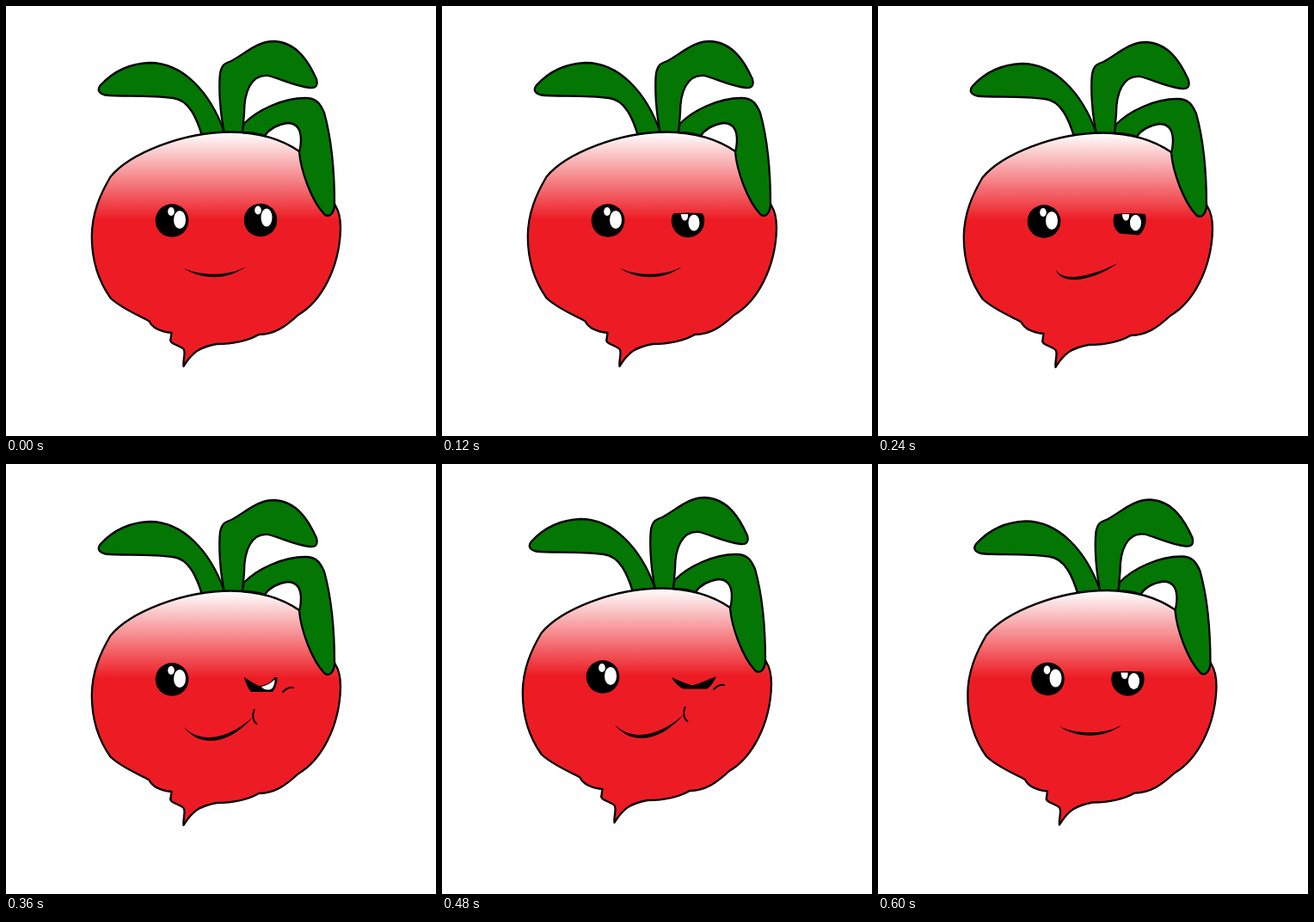
An HTML page that plays this animation: 500x500 px, repeating every 720 ms.

```html
<!DOCTYPE html>
<html lang="en">
<head>
<meta charset="utf-8">
<title>Winking radish</title>
<style>
html, body { margin: 0; width: 100%; height: 100%; overflow: hidden; background: #fff; }
svg { display: block; width: 100%; height: 100%; }
.leaf { fill: #047604; }
.leaf, .body { stroke: #000; stroke-width: 2.3; stroke-linejoin: round; }
.shine { fill: #fff; }
.line { fill: none; stroke: #000; stroke-width: 2; stroke-linecap: round; }
</style>
</head>
<body>
<svg viewBox="0 0 500 500">
  <defs>
    <linearGradient id="skin" gradientUnits="userSpaceOnUse" x1="0" y1="147" x2="0" y2="248">
      <stop offset="0" stop-color="#fff"/>
      <stop offset="1" stop-color="#ed1c24"/>
    </linearGradient>
  </defs>
  <g id="radish">
    <path class="leaf" d="M228 151C222 131 213 109 194 107C165 103.500 135 105.500 115 103.500C107 101 106 97 110 92C122 79 140 67 167 66C205 66 237 99 254 147Z"/>
    <path class="leaf" d="M254 148C249 125 247 95 249 78C251 69 253 67 262 64C280 54 292 41 312 41C338 42 352 65 361 85C363 93 360 96 353 95C335 93 318 84 305 81C285 79 277 100 277 124L275 148Z"/>
    <path class="body" fill="url(#skin)" d="M121.500 198.500C144 171.500 205 146.500 262 146.500C300 147 325 158 341 169L383 232C388 240 389 249 389 258C388 305 366 344 340 359C325 373 312 382 294 382C280 390 262 393 245 393C225 397 217 402 206.500 419C205.500 411 209.500 403 206.500 399C201.500 394 189 393 191.500 387L192.500 380C183 379 171 376 166.500 366.500C152 358.500 134 351.500 121.500 339.500C107 319 99.800 296 99.800 268C99.800 241 109.500 219 121.500 198.500Z"/>
    <path class="leaf" d="M275 147L276.500 137C292 121 322 107 348 107C362 107 366 115 370 124C380 160 382 200 382 232C381 241 376 247 370 242C355 226 343 192 341 170C344 158 346 136 327 136C315 138 306 143 301 151Q288 147 275 147Z"/>
    <circle cx="193" cy="249.500" r="19.300"/>
    <ellipse class="shine" cx="202" cy="248.500" rx="7" ry="10.500"/>
    <ellipse class="shine" cx="192" cy="239" rx="3.800" ry="5"/>

    <g data-show="open">
      <circle cx="296" cy="249" r="19.300"/>
      <ellipse class="shine" cx="303" cy="246" rx="6.500" ry="10.500"/>
      <ellipse class="shine" cx="293" cy="237.500" rx="3.800" ry="5"/>
    </g>
    <g data-show="lowered">
      <path d="M270 241Q286 240 302 241Q305 242 305.200 250A19.200 19.200 0 0 1 266.800 250Q267 242 270 241Z"/>
      <ellipse class="shine" cx="293" cy="252" rx="6.500" ry="9.500"/>
      <path class="shine" d="M278 242H286C287 252 278 252 278 242Z"/>
    </g>
    <g data-show="narrow">
      <path d="M275 241Q293 239 311 241C313 252 309 262 303 265.500L281 263.500C274 259 272 249 275 241Z"/>
      <ellipse class="shine" cx="299.500" cy="251" rx="6.500" ry="9.300"/>
      <path class="shine" d="M284 241H292C293 251 284 251 284 241Z"/>
    </g>
    <g data-show="closing">
      <path d="M276.500 247C284 251 289 255 295 257C303 256 310 252 312 247H315.500C315.500 255 313 260 310 264H285C281 260 279 253 276.500 247Z"/>
      <path class="shine" d="M297 258C304 256.500 309 253 312.500 249.500C312.500 255 311 259 308 261C303 262.500 299 261 297 258Z"/>
    </g>
    <path data-show="shut" d="M273 250C281 254 289 257 297 259.500C307 257 316 252 325 249C322 256 318 261 314 263.500H287C281 261 276 256 273 250Z"/>

    <path data-show="open lowered" d="M206 304.500C228 314.500 258 314.500 279 303C258 319 228 319 206 304.500Z"/>
    <path data-show="narrow" d="M206.500 305C214 320 245 315 279 298C250 319 212 325 206.500 305Z"/>
    <g data-show="closing shut">
      <path d="M206.500 304.500C224 323 254 322 287 293.500C258 327 224 328.500 206.500 304.500Z"/>
      <path class="line" d="M288.500 285C286 291 287 298 291.500 301M322 264C326 260 330 258 334 259"/>
    </g>
  </g>
</svg>
<script>
const STEP = 120;
// Each pose: face, horizontal shift, vertical shift
const poses = [
  ["open", 0, 0],
  ["lowered", 0, 0],
  ["narrow", 0, 1],
  ["closing", 0, 1],
  ["shut", -6, -2],
  ["lowered", 4.5, 0.5]
];
const radish = document.getElementById("radish");
const parts = document.querySelectorAll("[data-show]");

function draw(time) {
  const [face, x, y] = poses[Math.floor(time / STEP) % poses.length];
  radish.setAttribute("transform", `translate(${x} ${y})`);
  for (const part of parts) {
    const shown = part.dataset.show.split(" ").includes(face);
    part.style.display = shown ? "" : "none";
  }
}

const start = performance.now();
function tick() {
  draw(performance.now() - start);
  requestAnimationFrame(tick);
}
tick();
</script>
</body>
</html>
```
